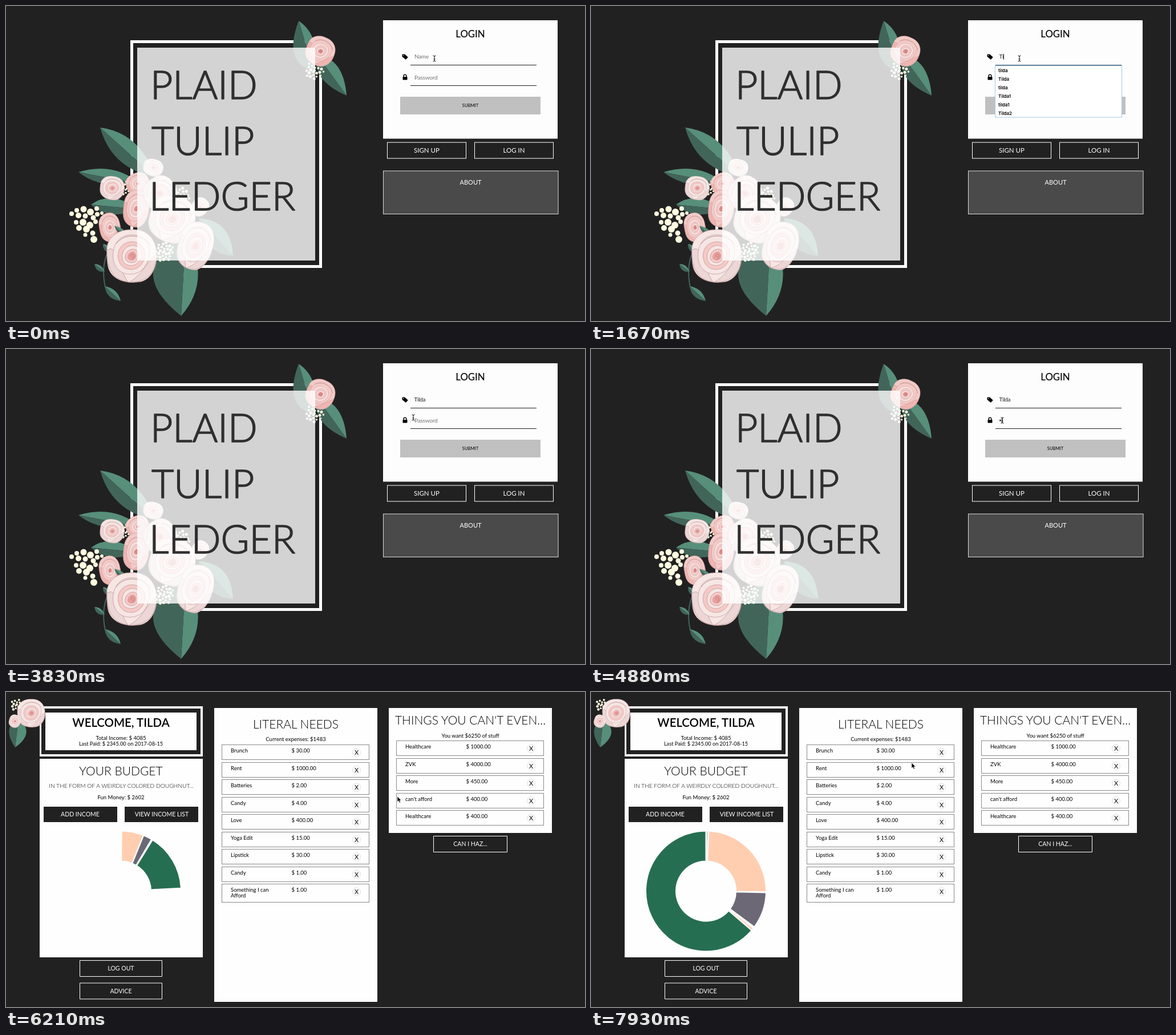
Animation, 1015 px wide and 552 px high, one loop 8000 ms. Source, as an HTML page:

```html
<!DOCTYPE html>
<html lang="en">
<head>
<meta charset="utf-8">
<title>Budget planner</title>
<style>
html, body { margin: 0; width: 100%; height: 100%; overflow: hidden; background: #212121; }
svg { display: block; width: 1015px; height: 552px; font-family: Lato, "Open Sans", sans-serif; }
.mid { text-anchor: middle; }
.body { font-size: 9.5px; }
.head { font-size: 21px; font-weight: 300; }
.btn { font-size: 10.5px; fill: #fff; text-anchor: middle; }
.brand { font-size: 68px; font-weight: 300; fill: #2f2f2f; stroke: #2f2f2f; stroke-width: 1.6; stroke-linejoin: round; }
.line { fill: none; stroke: #fff; }
.hint { font-size: 10px; letter-spacing: -.2px; fill: #757575; }
.typed { font-size: 10px; letter-spacing: -.3px; fill: #222; }
.list { font: 600 8px Inter, Arial, sans-serif; }
.pale { --o: #f6e6e4; --d: #ecd6d6; --m: #f5c9c6; --c: #ee9f9c; }
.pink { --o: #f4cac7; --d: #f0b5b1; --m: #f8dfdb; --c: #e98d8a; }
</style>
</head>
<body>
<svg viewBox="0 0 1015 552" xmlns="http://www.w3.org/2000/svg">
<defs>
  <g id="rose" stroke="#b98f92" stroke-width="1.5" stroke-linejoin="round">
    <path fill="var(--o)" d="M-96-20C-98-70-50-100 0-98C60-102 98-60 97-5C102 40 75 92 30 97C-20 104-75 90-90 45C-97 20-95 0-96-20Z"/>
    <path fill="var(--d)" d="M-96-20C-58-50-58 30-15 96C-75 90-97 40-96-20Z"/>
    <path fill="var(--d)" d="M97-5C60 15 45 72-10 98C60 100 98 60 97-5Z"/>
    <path fill="var(--o)" d="M-72 0C-72-60-30-84 14-78C62-74 80-30 66 10C54 58 12 74-24 66C-56 58-72 30-72 0Z"/>
    <path fill="var(--m)" d="M-52 4C-56-34-22-58 12-52C46-46 60-16 48 14C38 44 8 56-18 48C-40 42-50 24-52 4Z"/>
    <path fill="var(--o)" d="M-36 8C-40-22-14-44 14-38C36-32 44-8 34 12C24 32 4 40-14 34C-28 30-35 20-36 8Z"/>
    <path fill="var(--m)" d="M-25 8C-26-14-8-28 12-25C28-20 31-2 24 11C17 24 4 28-8 24C-18 21-24 15-25 8Z"/>
    <path fill="var(--c)" d="M-14 6C-14-8-3-16 8-14C18-10 19 2 14 9C8 17-12 18-14 6Z"/>
    <path fill="none" stroke="#8f6a6c" d="M4 4C-5 4-4-7 4-7C13-6 12 10 2 12M-60-45C-30-85 40-85 74-40"/>
  </g>
</defs>

<g id="login">
  <rect class="line" x="220.5" y="62.5" width="331" height="394" stroke-width="5"/>
  <g id="bouquet"></g>
  <rect x="230" y="73" width="312" height="373" fill="#fff" fill-opacity=".8"/>
  <g class="brand">
    <text x="253" y="163">PLAID</text>
    <text x="255" y="261">TULIP</text>
    <text x="251" y="358">LEDGER</text>
  </g>

  <rect x="661" y="25" width="306" height="207.5" fill="#fdfdfd"/>
  <text class="mid" x="814" y="54.5" font-size="16.8" font-weight="500">LOGIN</text>
  <path d="M694.5 85.5Q694.5 84.500 695.5 84.500H699L704.800 89.800L700.800 94L694.500 88.800Z"/>
  <circle cx="696.800" cy="86.800" r=".8" fill="#fff"/>
  <rect x="695.500" y="124" width="8" height="5.500" rx=".8"/>
  <path d="M697 124.500V122.800a2.500 2.500 0 0 1 5 0V124.500" fill="none" stroke="#000" stroke-width="1.400"/>
  <path d="M709 103.500H930M709 139.500H930" stroke="#222"/>
  <text class="hint" id="nameHint" x="716" y="92">Name</text>
  <text class="hint" id="passHint" x="716" y="128.500">Password</text>
  <text class="typed" id="name" x="715.500" y="92"></text>
  <circle id="dot" cx="717.500" cy="125" r="1.500" fill="#222"/>
  <rect id="caret" width="1" height="10" fill="#222"/>

  <rect id="submit" x="691" y="159" width="246" height="31" fill="#c0c0c0"/>
  <rect id="ring" x="690" y="157.500" width="248" height="34" rx="2" fill="none" stroke="#a8cdfb" stroke-width="2"/>
  <text class="mid" id="submitText" x="814" y="176.500" font-size="7.600">SUBMIT</text>

  <g id="menu">
    <rect x="708.500" y="104" width="222" height="91" fill="#fff" stroke="#a5c9e6"/>
    <path d="M709 103.800H930" stroke="#35607f" stroke-width="1.500"/>
    <g class="list" id="items"></g>
  </g>

  <rect class="line" x="668.500" y="239" width="138" height="28"/>
  <rect class="line" x="821.500" y="239" width="138" height="28"/>
  <text class="btn" x="737.500" y="257" style="font-size:11.500px">SIGN UP</text>
  <text class="btn" x="890.500" y="257" style="font-size:11.500px">LOG IN</text>
  <rect x="661.500" y="289" width="306.500" height="75.500" fill="#4a4a4a" stroke="#ddd"/>
  <text class="btn" x="814.500" y="313" style="font-size:11px">ABOUT</text>
</g>

<g id="home">
  <g fill="#fefefe">
    <rect x="59" y="25" width="286" height="88"/>
    <rect x="59" y="117" width="286" height="348"/>
    <rect x="365" y="28" width="286" height="515"/>
    <rect x="671" y="28" width="286" height="219"/>
  </g>
  <rect x="65.500" y="32.500" width="272" height="73" fill="none" stroke="#212121" stroke-width="7"/>
  <g id="badge"></g>
  <g class="mid">
    <text x="201.500" y="61" font-size="20.400" font-weight="600">WELCOME, TILDA</text>
    <text class="body" x="201.500" y="83.500">Total Income: $ 4085</text>
    <text class="body" x="201.500" y="93.500" style="font-size:9.200px">Last Paid: $ 2345.00 on 2017-08-15</text>
    <text class="head" x="201.500" y="145.500">YOUR BUDGET</text>
    <text x="202" y="168" font-size="10.200" font-weight="300">IN THE FORM OF A WEIRDLY COLORED DOUGHNUT...</text>
    <text class="body" x="201.500" y="188">Fun Money: $ 2602</text>
    <text class="head" x="508" y="63.500">LITERAL NEEDS</text>
    <text class="body" x="508" y="86">Current expenses: $1483</text>
    <text class="head" x="814" y="57">THINGS YOU CAN'T EVEN...</text>
    <text class="body" x="814" y="79.500">You want $6250 of stuff</text>
  </g>
  <path d="M66 201H195V228H66ZM208 201H337V228H208Z" fill="#212121"/>
  <path class="line" d="M129.500 470.500H273.500V498.500H129.500ZM129.500 510H273.500V538H129.500ZM749.500 252.500H878.500V280.500H749.500Z"/>
  <text class="btn" x="130" y="217.500">ADD INCOME</text>
  <text class="btn" x="273" y="217.500">VIEW INCOME LIST</text>
  <text class="btn" x="201.500" y="488">LOG OUT</text>
  <text class="btn" x="201.500" y="527.500">ADVICE</text>
  <text class="btn" x="814" y="270">CAN I HAZ...</text>
  <g id="rows"></g>
  <g id="chart" stroke="#fefefe" stroke-width="2"></g>
</g>

<g id="beam">
  <path d="M-2.500-5Q0-5 0-3.500Q0-5 2.500-5M0-4V4M-2.500 5Q0 5 0 3.500Q0 5 2.500 5M-1.500 1H1.500" fill="none" stroke="#111"/>
</g>
<path id="arrow" d="M0 0V9.500L2.200 7.500L3.800 11L5.500 10.200L4 6.900H7Z" fill="#000" stroke="#fff" stroke-width=".6"/>
</svg>

<script>
const $ = id => document.getElementById(id);

function add(parent, tag, attrs, text) {
  const el = document.createElementNS('http://www.w3.org/2000/svg', tag);
  for (const k in attrs) el.setAttribute(k, attrs[k]);
  if (text) el.textContent = text;
  return parent.appendChild(el);
}

// Flowers
const LIGHT = '#578f7b', DARK = '#42655a';

function leaf(g, tip, base, lightSide, darkSide) {
  add(g, 'path', { d: `M${tip}Q${lightSide} ${base}Z`, fill: LIGHT });
  add(g, 'path', { d: `M${tip}Q${darkSide} ${base}Z`, fill: DARK });
}

function rose(g, kind, x, y, rx, ry, turn) {
  add(g, 'use', { href: '#rose', class: kind,
    transform: `translate(${x} ${y}) rotate(${turn}) scale(${rx / 100} ${ry / 100})` });
}

function berry(g, cx, cy, r) {
  add(g, 'circle', { cx, cy, r, fill: '#fdfbe0' });
}

function cluster(g, x, y, count, gap, r) {
  for (let i = 0; i < count; i++) {
    const a = i * 2.4, d = gap * Math.sqrt(i);
    berry(g, x + d * Math.cos(a), y + d * Math.sin(a), r * (0.85 + 0.15 * Math.sin(i * 5)));
  }
}

function drawBouquet(g) {
  leaf(g, [165, 213], [262, 300], [235, 222], [185, 285]);
  leaf(g, [127, 291], [235, 312], [190, 272], [165, 322]);
  leaf(g, [149, 348], [232, 356], [185, 322], [180, 378]);
  leaf(g, [307, 543], [315, 400], [362, 480], [205, 462]);
  leaf(g, [398, 438], [338, 372], [395, 375], [345, 435]);
  leaf(g, [513, 26], [540, 115], [552, 52], [485, 100]);
  leaf(g, [597, 157], [545, 85], [592, 92], [535, 130]);
  add(g, 'path', { d: 'M180 428Q166 455 174 493', fill: 'none', stroke: DARK, 'stroke-width': 2 });
  leaf(g, [201, 517], [173, 491], [196, 495], [176, 514]);
  leaf(g, [155, 452], [173, 466], [168, 452], [157, 467]);
  leaf(g, [170, 417], [184, 434], [182, 418], [169, 430]);

  const big = [124,358,4, 136,356,5.5, 148,361,6, 159,355,4, 115,364,4, 127,367,5, 139,368,4.5,
    153,371,4.5, 160,365,4, 168,363,3, 123,379,4, 135,379,6, 147,384,6, 157,378,4, 128,389,5,
    141,391,6, 152,398,4.5, 139,401,3.5, 154,409,6];
  for (let i = 0; i < big.length; i += 3) berry(g, big[i], big[i + 1], big[i + 2]);
  cluster(g, 212, 320, 18, 3.1, 2.4);
  cluster(g, 306, 335, 26, 3.4, 2.7);
  cluster(g, 277, 430, 28, 3.3, 2.8);
  cluster(g, 541, 113, 24, 3.4, 2.6);

  rose(g, 'pale', 186, 319, 22, 21, 10);
  rose(g, 'pink', 231, 311, 21, 19, -20);
  rose(g, 'pale', 258, 283, 18, 15, 15);
  rose(g, 'pink', 228, 355, 23, 33, 8);
  rose(g, 'pale', 270, 328, 30, 30, 60);
  rose(g, 'pale', 340, 352, 15, 17, 40);
  rose(g, 'pink', 182, 388, 19, 26, -8);
  leaf(g, [190, 385], [216, 408], [212, 390], [196, 404]);
  rose(g, 'pale', 291, 373, 41, 42, 20);
  rose(g, 'pale', 332, 420, 31, 43, 18);
  rose(g, 'pale', 220, 438, 45, 47, 0);
  rose(g, 'pink', 551, 79, 26, 26, 25);
}

function drawBadge(g) {
  leaf(g, [16, 97], [22, 46], [52, 72], [-8, 62]);
  cluster(g, 19, 22, 15, 2.8, 2.3);
  rose(g, 'pale', 44, 37, 25, 25, 0);
  rose(g, 'pale', 15.5, 51, 10.5, 11.5, 20);
}

// Lists
const needs = [['Brunch', 30], ['Rent', 1000], ['Batteries', 2], ['Candy', 4], ['Love', 400],
  ['Yoga Edit', 15], ['Lipstick', 30], ['Candy', 1], ['Something I can|Afford', 1]];
const wants = [['Healthcare', 1000], ['ZVK', 4000], ['More', 450], ["can't afford", 400], ['Healthcare', 400]];

function drawRows(list, x, top) {
  const g = $('rows');
  list.forEach(([label, cost], i) => {
    const y = top + i * 30.5, lines = label.split('|');
    add(g, 'rect', { x: x + .5, y: Math.round(y) + .5, width: 258, height: lines[1] ? 32 : 26, fill: 'none', stroke: '#8a8a8a' });
    lines.forEach((s, n) => add(g, 'text', { class: 'body', x: x + 16, y: y + 14 + n * 10 }, s));
    add(g, 'text', { class: 'body', x: x + 122.5, y: y + 14 }, '$ ' + cost.toFixed(2));
    add(g, 'circle', { cx: x + 236.5, cy: y + 14, r: 7, fill: '#fff', stroke: '#ddd' });
    add(g, 'text', { class: 'mid', x: x + 236.5, y: y + 18, 'font-size': 11 }, 'X');
  });
}

// Doughnut
const GREY = '#d6d6d6', PEACH = '#ffceb1', PLUM = '#6c6876', GREEN = '#266e51';
const colors = [GREY, PEACH, GREEN, GREY, PLUM, GREY, PEACH, GREEN, GREY, GREEN];
const shares = [...needs.map(n => n[1]), 2602];
const total = shares.reduce((a, b) => a + b);
const slices = colors.map(fill => add($('chart'), 'path', { fill }));

function polar(r, a) {
  return `${201.5 + r * Math.sin(a)} ${349 - r * Math.cos(a)}`;
}

function drawChart(t) {
  const p = Math.min(1, Math.max(0, (t - 6143) / 1000));
  const grown = 1 - (1 - p) ** 4;
  let a = 0;
  shares.forEach((v, i) => {
    const b = a + v / total * 2 * Math.PI * grown;
    const large = b - a > Math.PI ? 1 : 0;
    slices[i].setAttribute('d',
      `M${polar(105.5, a)}A105.5 105.5 0 ${large} 1 ${polar(105.5, b)}L${polar(52.5, b)}A52.5 52.5 0 ${large} 0 ${polar(52.5, a)}Z`);
    a = b;
  });
}

// Timeline: each entry holds until the next one
const pointer = [
  [0, 751, 92, 'beam'], [2590, 743, 93, 'beam'], [2740, 729, 95, 'beam'], [2890, 715, 97, 'beam'],
  [3040, 703, 97, 'arrow'], [3200, 695, 98, 'arrow'], [3350, 690, 99, 'arrow'],
  [3660, 698, 110, 'arrow'], [3820, 714, 120, 'beam'], [3980, 721, 125, 'beam'],
  [5060, 718, 132, 'beam'], [5220, 709, 146, 'arrow'], [5380, 701, 160, 'arrow'], [5540, 695, 172, 'arrow'],
  [5700, 692, 180, 'arrow'], [5860, 690, 183, 'arrow'], [6030, 686, 183, 'arrow'],
  [6390, 610, 190, 'arrow'], [6570, 500, 202, 'arrow'], [6770, 420, 209, 'arrow'], [7010, 373, 211, 'arrow'],
  [7190, 385, 206, 'arrow'], [7340, 428, 187, 'arrow'], [7490, 483, 162, 'arrow'],
  [7640, 528, 141, 'arrow'], [7780, 553, 129, 'arrow'], [7930, 562, 124, 'arrow']
];
const typing = [[0, ''], [1190, 'T'], [1670, 'Ti'], [1840, 'Tild'], [1990, 'Tilda']];
const carets = [[0, ''], [450, 'name'], [890, ''], [1190, 'name'], [2440, ''], [2890, 'name'],
  [3500, ''], [3980, 'pass'], [4430, ''], [4880, 'pass'], [5380, '']];
const chartTimes = [[0], [6210], [6390], [6570], [6770], [7010], [7190]];

const at = (track, t) => track.filter(k => k[0] <= t).pop();
const show = (id, on) => { $(id).style.display = on ? '' : 'none'; };

function render(t) {
  const home = t >= 6210;
  show('login', !home);
  show('home', home);

  const [, x, y, shape] = at(pointer, t);
  for (const id of ['beam', 'arrow']) show(id, id === shape);
  $(shape).setAttribute('transform', `translate(${x} ${y})`);

  if (home) return drawChart(at(chartTimes, t)[0]);

  const word = at(typing, t)[1], caret = at(carets, t)[1], dot = t >= 4880;
  $('name').textContent = word;
  show('nameHint', !word);
  show('passHint', !dot);
  show('dot', dot);
  show('menu', t >= 1190 && t < 3500);
  show('caret', caret);
  if (caret) {
    const width = caret === 'name' ? (word ? $('name').getComputedTextLength() : 0) : (dot ? 4.5 : 0);
    $('caret').setAttribute('x', 715 + Math.round(width));
    $('caret').setAttribute('y', caret === 'name' ? 84 : 120);
  }
  const hover = t >= 5540;
  $('submit').setAttribute('fill', hover ? '#d0d0d0' : '#c0c0c0');
  $('submitText').setAttribute('fill', hover ? '#555' : '#000');
  show('ring', t >= 5860);
}

drawBouquet($('bouquet'));
drawBadge($('badge'));
drawRows(needs, 378, 92);
drawRows(wants, 684, 85);
['tilda', 'Tilda', 'tilda', 'Tilda1', 'tilda1', 'Tilda2'].forEach((s, i) =>
  add($('items'), 'text', { x: 714, y: 116 + i * 15 }, s));

const start = performance.now();
function tick() {
  render((performance.now() - start) % 8000);
  requestAnimationFrame(tick);
}
tick();
</script>
</body>
</html>
```
